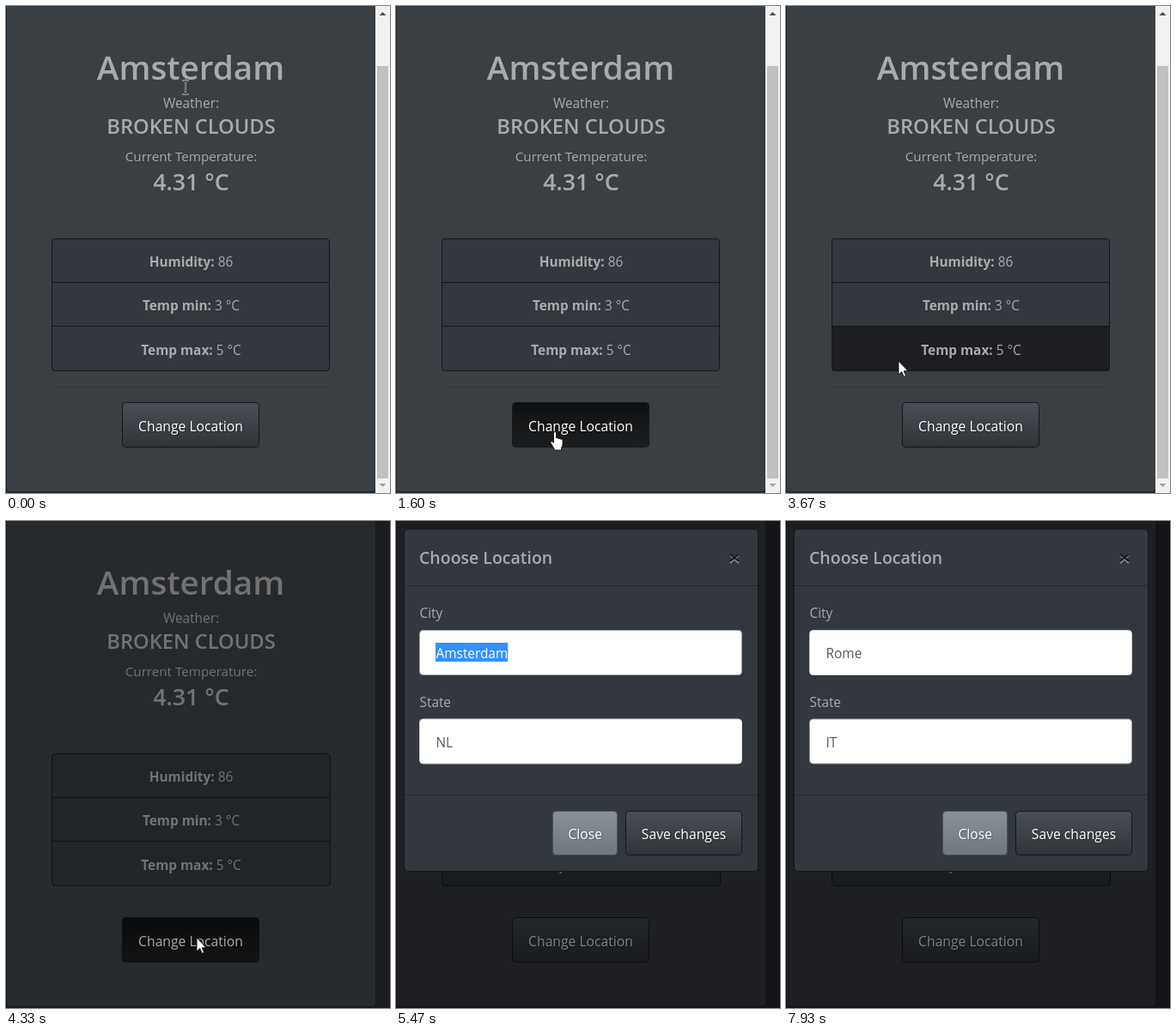
Recreate the animation shown at these times as an HTML page. Size 447 by 568 pixels, loop 8 s.

```html
<!DOCTYPE html>
<html lang="en">
<head>
<meta charset="utf-8">
<title>Weather</title>
<style>
  html, body { margin: 0; width: 100%; height: 100%; overflow: hidden; background: #272b30; }
  svg { display: block; width: 100vw; height: 100vh; font: 15.4px "Open Sans", "Noto Sans", sans-serif; cursor: default; }
  text { fill: #aaa; white-space: pre; }
  .mid { text-anchor: middle; }
  .semi { font-weight: 600; }
  .bold { font-weight: 700; }
  .btn { font-size: 15.7px; fill: #fff; text-shadow: 1px 1px 1px rgba(0,0,0,.3); }
  .edge { stroke: #16181a; }
  .field { fill: #fff; }
  .value { fill: #54585d; }
  .picked { fill: #fff; }
</style>
</head>
<body>
<svg viewBox="0 0 447 568" preserveAspectRatio="none">
  <defs>
    <linearGradient id="dark" x2="0" y2="1">
      <stop stop-color="#484e55"/><stop offset=".6" stop-color="#3a3f44"/><stop offset="1" stop-color="#313539"/>
    </linearGradient>
    <linearGradient id="over" x2="0" y2="1">
      <stop stop-color="#0e0f10"/><stop offset=".4" stop-color="#151618"/><stop offset="1" stop-color="#1b1d1f"/>
    </linearGradient>
    <linearGradient id="grey" x2="0" y2="1">
      <stop stop-color="#8a9196"/><stop offset=".6" stop-color="#7a8288"/><stop offset="1" stop-color="#70787d"/>
    </linearGradient>
    <clipPath id="listClip"><rect id="listShape" x="53" y="271" width="324" height="155" rx="4"/></clipPath>
  </defs>

  <rect width="447" height="568" fill="#272b30"/>
  <rect x=".5" y="-10" width="430" height="576.5" rx="4" fill="#3a3f44" stroke="#212428"/>

  <g class="mid">
    <text class="semi" x="215" y="86" font-size="38.7">Amsterdam</text>
    <text x="215.5" y="119">Weather:</text>
    <text class="semi" x="215.5" y="149" font-size="23.7">BROKEN CLOUDS</text>
    <text x="215.5" y="181" font-size="15.2">Current Temperature:</text>
    <text class="semi" x="215.5" y="214.5" font-size="26.8">4.31 °C</text>
  </g>

  <g clip-path="url(#listClip)" id="rows"></g>
  <rect id="listEdge" class="edge" x="53.5" y="271.5" width="323" height="154" rx="4" fill="none"/>
  <g class="mid" id="rowText"></g>
  <path d="M53 444.5H377" stroke="#34383d"/>

  <rect id="change" class="edge" x="135.5" y="462.5" width="159" height="52" rx="4"/>
  <text class="btn mid" x="215" y="496">Change Location</text>

  <g id="scroll">
    <rect x="430" width="17" height="568" fill="#f1f1f1"/>
    <rect x="432" y="70" width="13" height="481" fill="#c1c1c1"/>
    <path d="M434.5 11l4-4 4 4z" fill="#505050"/>
    <path d="M434.5 557l4 4 4-4z" fill="#a3a3a3"/>
  </g>
  <rect id="shade" width="447" height="568"/>

  <g id="modal">
    <rect class="edge" x="9.5" y="9.5" width="412" height="399" rx="5" fill="#32383e"/>
    <path d="M10 75.5H421M10 319.5H421" stroke="#25292d"/>
    <text class="semi" x="27" y="50" font-size="19.5">Choose Location</text>
    <path d="M389 40l10 9m0-9l-10 9" stroke="#92969a" stroke-width="1.7"/>
    <path d="M389 39l10 8m0-8l-10 8" stroke="#15181a" stroke-width="1.8"/>
    <text x="27.5" y="113">City</text>
    <text x="27.5" y="217">State</text>
    <g id="fields"></g>
    <rect x="182.5" y="338.5" width="75" height="51" rx="4" fill="url(#grey)" stroke="#4c5257"/>
    <rect class="edge" x="267.5" y="338.5" width="135" height="51" rx="4" fill="url(#dark)"/>
    <text class="btn mid" x="220.2" y="371">Close</text>
    <text class="btn mid" x="335" y="371">Save changes</text>
  </g>

  <g id="pointer">
    <path id="arrow" d="M0 0V16L3.7 12.6 6.2 18.3 8.6 17.2 6.2 11.7H11Z" fill="#fff" stroke="#111" stroke-width=".9"/>
    <path id="hand" d="M-1.5 .5Q0-1.5 1.5 .5V7Q3 6 4 7.5 5.5 6.8 6.5 8.2 8.5 7.5 9 9.5V14Q9 17 7.5 18V21H-1V19Q-3 16-5 12.5-5 10-3 10.8L-1.5 12.5Z" fill="#fff" stroke="#111" stroke-width=".9"/>
    <g id="beam" fill="none">
      <path d="M-3.5-8H-1L0-7 1-8H3.5M0-7V7M-3.5 8H-1L0 7 1 8H3.5" stroke="#d8d8d8" stroke-width="2.2"/>
      <path d="M-3-8H-1L0-7 1-8H3M0-7V7M-3 8H-1L0 7 1 8H3" stroke="#17191b"/>
    </g>
  </g>
</svg>
<script>
const LOOP = 8000, FPS = 15;
const $ = id => document.getElementById(id);
const clamp = v => Math.max(0, Math.min(1, v));
const show = (el, on) => el.setAttribute('visibility', on ? 'inherit' : 'hidden');

function set(el, attrs) {
  for (const k in attrs) el.setAttribute(k, attrs[k]);
}
function add(parent, tag, attrs, text) {
  const el = document.createElementNS('http://www.w3.org/2000/svg', tag);
  set(el, attrs);
  if (text) el.textContent = text;
  parent.appendChild(el);
  return el;
}

// weather list
const rowTops = [271, 323, 374, 426];
const rows = [['Humidity:', '86'], ['Temp min:', '3 °C'], ['Temp max:', '5 °C']].map(([name, value], i) => {
  const y = rowTops[i];
  const rect = add($('rows'), 'rect', { x: 53, y, width: 325, height: rowTops[i + 1] - y });
  if (i) add($('rows'), 'path', { d: `M53 ${y - .5}H378`, class: 'edge' });
  const label = add($('rowText'), 'text', { x: 215.5, y: [304, 355, 407][i] });
  add(label, 'tspan', { class: 'bold' }, name);
  label.append(' ' + value);
  return rect;
});

// text inputs
function makeField(id, top) {
  const g = $('fields'), y = top + 33;
  const clip = add(add(g, 'clipPath', { id }), 'rect', { y: top, height: 53 });
  return {
    box: add(g, 'rect', { class: 'field', x: 27.5, y: top + .5, width: 375, height: 52, rx: 4 }),
    text: add(g, 'text', { class: 'value', x: 46.5, y }),
    mark: add(g, 'rect', { y: top + 15, height: 22, fill: '#3390ff' }),
    picked: add(g, 'text', { class: 'picked', x: 46.5, y, 'clip-path': `url(#${id})` }),
    caret: add(g, 'rect', { y: top + 15, width: 1, height: 23, fill: '#333' }),
    clip
  };
}
const city = makeField('cityPick', 127), state = makeField('statePick', 230.5);

function drawField(f, value, focused, from, caretOn) {
  f.text.textContent = f.picked.textContent = value;
  const end = 46.5 + f.text.getComputedTextLength();
  const sel = { x: Math.min(from, end), width: Math.max(0, end - from) };
  set(f.mark, sel);
  set(f.clip, sel);
  set(f.caret, { x: Math.round(end - .3) });
  show(f.caret, caretOn);
  f.box.setAttribute('stroke', focused ? '#9da2a7' : '#ced4da');
}

// pointer path: time, x, y
const path = [
  [470, 209, 95], [700, 214, 345], [930, 211, 86], [1130, 211, 86],
  [1600, 185, 497], [1930, 222, 498], [2130, 240, 480], [2400, 226, 508],
  [2600, 243, 490], [2800, 221, 480], [3130, 215, 90], [3670, 131, 414],
  [4070, 222, 486], [4670, 222, 486], [5000, 132, 155], [5130, 130, 156],
  [5330, 78, 162], [5400, 27, 173]
];
function pointerAt(t) {
  const i = path.findIndex(p => p[0] >= t);
  if (i < 1) return path[i < 0 ? path.length - 1 : 0].slice(1);
  const [t0, x0, y0] = path[i - 1], [t1, x1, y1] = path[i];
  const p = (t - t0) / (t1 - t0), e = p * p * (3 - 2 * p);
  return [x0 + (x1 - x0) * e, y0 + (y1 - y0) * e];
}

// typed text: latest entry whose time has passed
const cityKeys = [[0, 'Amsterdam'], [6270, 'R'], [6400, 'Ro'], [6470, 'Rom'], [6600, 'Rome']];
const stateKeys = [[0, 'NL'], [7270, 'I'], [7400, 'IT']];
const typed = (keys, t) => keys.filter(k => k[0] <= t).pop()[1];

function draw(t) {
  const open = t >= 4270, [x, y] = pointerAt(t);
  const inside = (l, r, top, bottom) => x >= l && x <= r && y >= top && y < bottom;

  rows.forEach((r, i) => {
    const hot = !open && inside(53, 377, rowTops[i], rowTops[i + 1]);
    r.setAttribute('fill', hot ? '#1c1e22' : '#32383e');
  });
  const onButton = inside(135, 295, 462, 515);
  $('change').setAttribute('fill', onButton && t < 4400 ? 'url(#over)' : 'url(#dark)');
  set($('listShape'), { width: open ? 325 : 324 });
  set($('listEdge'), { width: open ? 324 : 323 });

  show($('scroll'), !open);
  $('shade').setAttribute('opacity', .5 * clamp((t - 4230) / 150));
  const slide = Math.pow(1 - clamp((t - 4370) / 290), 2);
  set($('modal'), { opacity: clamp((t - 4370) / 150), transform: `translate(0 ${-50 * slide})` });

  let cityFrom = 999;
  if (t >= 5130 && t < 6270) cityFrom = t >= 5470 ? 46 : Math.max(78, x);
  drawField(city, typed(cityKeys, t), t >= 5070 && t < 7000, cityFrom, t >= 6270 && t < 7000);
  drawField(state, typed(stateKeys, t), t >= 7000, t >= 7000 && t < 7270 ? 46 : 999, t >= 7270 && t < 7930);

  const overText = open
    ? t >= 4670 && (t >= 5130 || inside(27, 403, 127, 180) || inside(27, 403, 230, 284))
    : inside(107, 323, 45, 218) || [298, 349, 401].some(c => inside(156, 275, c - 11, c + 11));
  const kind = overText ? 'beam' : onButton && !open ? 'hand' : 'arrow';
  for (const k of ['beam', 'hand', 'arrow']) show($(k), k === kind);
  show($('pointer'), t < 5470);
  $('pointer').setAttribute('transform', `translate(${Math.round(x)} ${Math.round(y)})`);
}

const start = performance.now();
function tick() {
  const t = (performance.now() - start) % LOOP;
  draw(Math.round(Math.floor((t + 4) * FPS / 1000) * 100 / FPS) * 10);
  requestAnimationFrame(tick);
}
tick();
</script>
</body>
</html>
```
